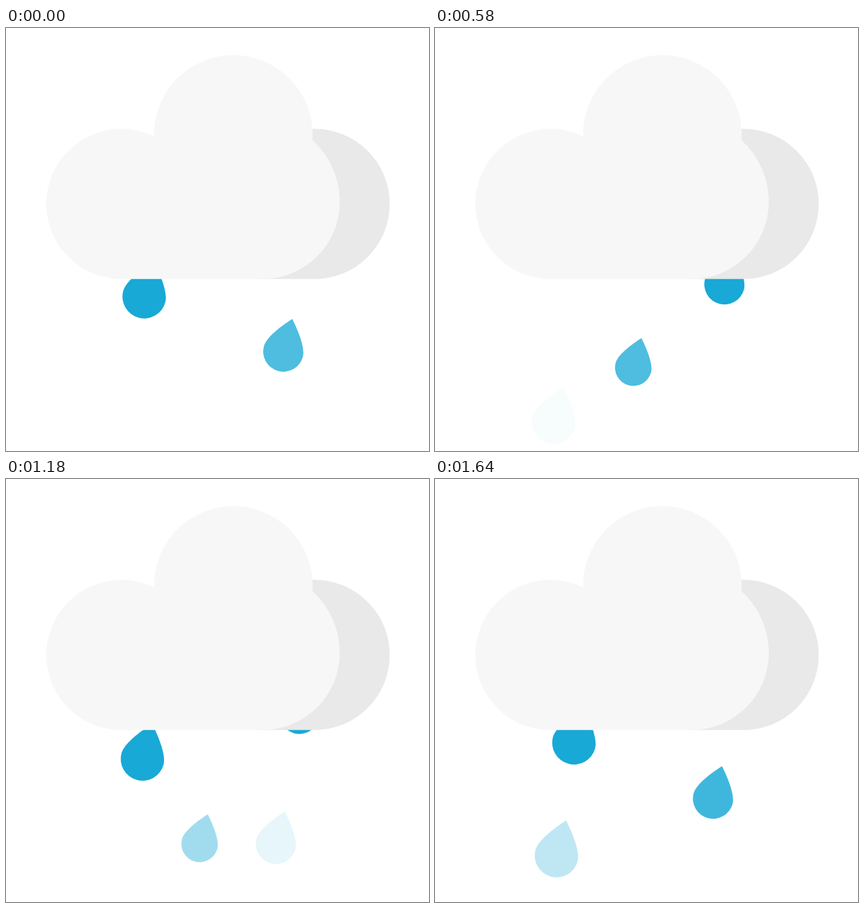
An HTML page without scripts for the animation above (1.66 s loop, 640x640 px).

```html
<!DOCTYPE html>
<html lang="en">
<head>
<meta charset="utf-8">
<title>Rain cloud</title>
<style>
  /* One clock in ms drives every drop, ticking each 20 ms. */
  @property --t {
    syntax: "<number>";
    inherits: true;
    initial-value: 0;
  }
  @keyframes clock {
    from { --t: 0; }
    to { --t: 1660; }
  }
  html, body {
    margin: 0;
    width: 100%;
    height: 100%;
    overflow: hidden;
    background: #fff;
  }
  svg {
    display: block;
    width: 100%;
    height: 100%;
    animation: clock 1660ms steps(83) -1ms infinite;
  }

  /* Column: x at y 520, drift per px fallen, scale, y where faded out, fade length */
  .left   { --x: 196.7; --drift: .155; --scale: 1;    --end: 632; --fade: 108; }
  .middle { --x: 304.1; --drift: .185; --scale: .841; --end: 622; --fade: 105; }
  .right  { --x: 419.7; --drift: .18;  --scale: .926; --end: 592; --fade: 94; }

  /* Drop: its bottom is at y0 when the clock reads t0, falling v px per ms */
  use {
    --y: calc(var(--y0) + var(--v) * (var(--t) - var(--t0)));
    transform:
      translate(
        calc((var(--x) - var(--drift) * (var(--y) - 520)) * 1px),
        calc(var(--y) * 1px))
      scale(var(--scale));
    opacity: calc((var(--end) - var(--y)) / var(--fade));
  }
</style>
</head>
<body>
<svg viewBox="0 0 640 640">
  <defs>
    <path id="drop" fill="#18a9d6" transform="translate(0 -33) rotate(15.3)"
      d="M0-55C0-55 33-20 33 0A33 33 0 0 1-33 0C-33-20 0-55 0-55Z"/>
    <clipPath id="below"><rect y="370" width="640" height="270"/></clipPath>
  </defs>

  <g clip-path="url(#below)">
    <g class="left">
      <use href="#drop" style="--t0:0; --y0:439.4; --v:.327"/>
      <use href="#drop" style="--t0:1020; --y0:405.6; --v:.318"/>
      <use href="#drop" style="--t0:1640; --y0:432; --v:.326"/>
    </g>
    <g class="middle">
      <use href="#drop" style="--t0:240; --y0:412; --v:.381"/>
      <use href="#drop" style="--t0:800; --y0:438; --v:.373"/>
    </g>
    <g class="right">
      <use href="#drop" style="--t0:0; --y0:520; --v:.283"/>
      <use href="#drop" style="--t0:580; --y0:418.3; --v:.274"/>
      <use href="#drop" style="--t0:1360; --y0:436; --v:.279"/>
    </g>
  </g>

  <path fill="#e9e9e9" d="M460 152.6H467A113.6 113.6 0 0 1 467 379.8H380V263H460Z"/>
  <g fill="#f7f7f7">
    <circle cx="174.6" cy="266.2" r="113.6"/>
    <circle cx="344" cy="161" r="120"/>
    <path d="M174.6 379.8H388.2A116.8 116.8 0 0 0 505 263A126 126 0 0 0 464 170L344 120L224 170L174.6 200Z"/>
  </g>
</svg>
</body>
</html>
```
